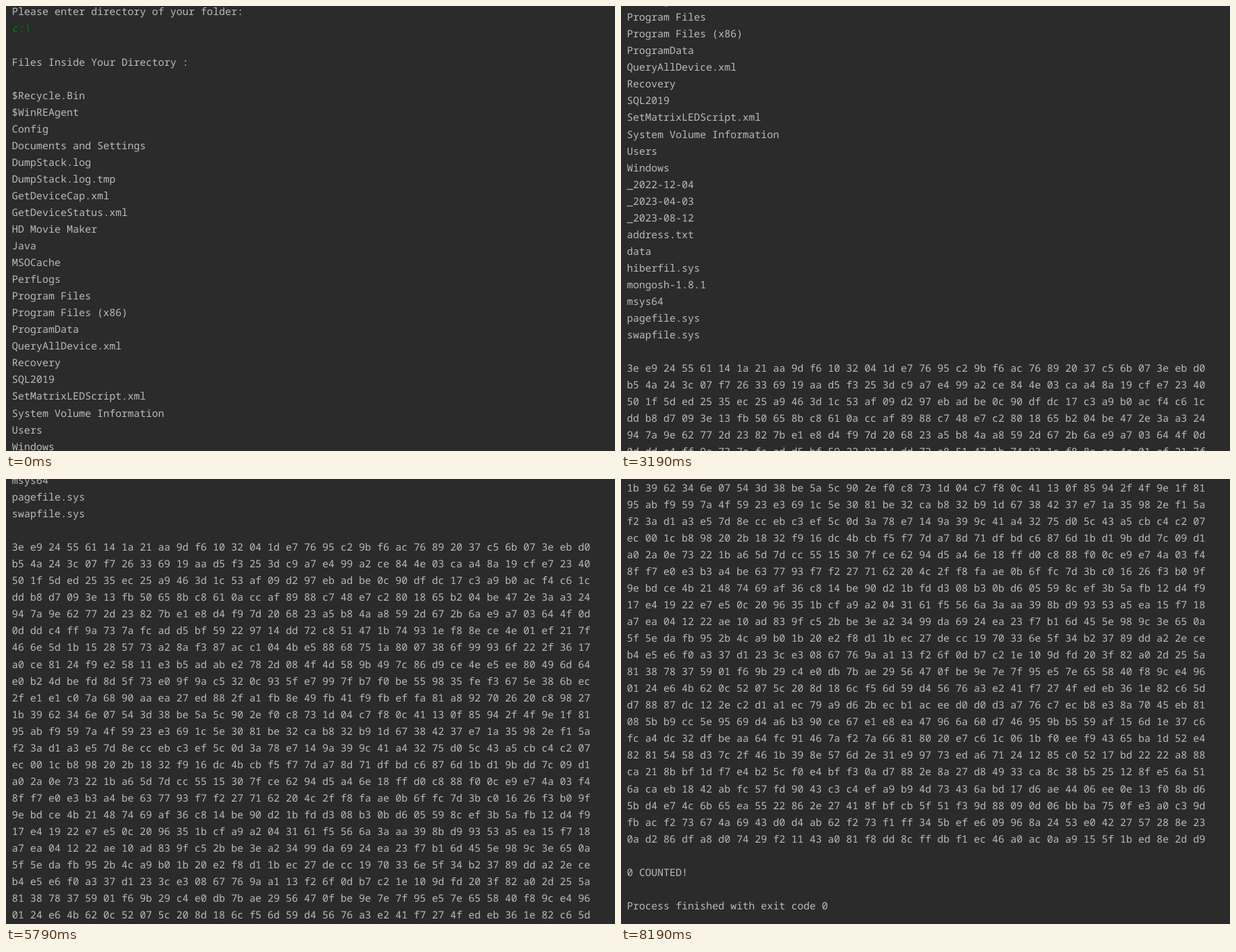
These frames come from a looping animation (875 px wide and 640 px high, 9190 ms). An HTML page:

```html
<!DOCTYPE html>
<html lang="en">
<head>
<meta charset="utf-8">
<title>Console scroll</title>
<style>
  html, body {
    margin: 0;
    width: 100%;
    height: 100%;
    overflow: hidden;
    background: #2b2b2b;
  }
  #stage {
    position: relative;
    width: 100%;
    height: 100%;
    overflow: hidden;
    contain: strict;
  }
  #console {
    position: absolute;
    left: 8.5px;
    top: -3.6px;
    margin: 0;
    color: #bbb;
    font: 500 14.59px/24.04px "Noto Sans Mono", monospace;
    font-variant-ligatures: none;
    text-rendering: geometricPrecision;
  }
  #console i { color: #007f00; }
</style>
</head>
<body>
<div id="stage"><pre id="console">Please enter directory of your folder:
<i>c:\</i>

Files Inside Your Directory :

$Recycle.Bin
$WinREAgent
Config
Documents and Settings
DumpStack.log
DumpStack.log.tmp
GetDeviceCap.xml
GetDeviceStatus.xml
HD Movie Maker
Java
MSOCache
PerfLogs
Program Files
Program Files (x86)
ProgramData
QueryAllDevice.xml
Recovery
SQL2019
SetMatrixLEDScript.xml
System Volume Information
Users
Windows
_2022-12-04
_2023-04-03
_2023-08-12
address.txt
data
hiberfil.sys
mongosh-1.8.1
msys64
pagefile.sys
swapfile.sys

<span id="dump"></span>

0 COUNTED!

Process finished with exit code 0
</pre></div>
<script>
const LOOP = 9190;
const STEP = 200;
const LAST_STEP = 41;
const DUMP_ROWS = 32;
const BYTES_PER_ROW = 32;
const output = document.getElementById("console");

// Scroll position in pixels at chosen steps
const scrollKeys = [
  [0, 0], [11, 262], [20, 513], [25, 686.5], [33, 961.5],
  [37, 1088], [38, 1117], [39, 1137], [41, 1150]
];

function seededBytes(seed) {
  return () => {
    seed = (Math.imul(seed, 1664525) + 1013904223) >>> 0;
    return seed >>> 24;
  };
}

function hexDump(nextByte) {
  const hexByte = () => nextByte().toString(16).padStart(2, "0");
  const row = () => Array.from({ length: BYTES_PER_ROW }, hexByte).join(" ");
  return Array.from({ length: DUMP_ROWS }, row).join("\n");
}

// The steps run slightly ahead of an even 200 ms beat
function stepAt(time) {
  const lead = time < 1000 ? 0 : time > 2000 && time < 3500 ? 20 : 10;
  return Math.min(LAST_STEP, Math.floor((time + lead) / STEP));
}

function scrollAt(step) {
  const next = Math.max(1, scrollKeys.findIndex(([at]) => at >= step));
  const [startStep, start] = scrollKeys[next - 1];
  const [endStep, end] = scrollKeys[next];
  return start + (end - start) * (step - startStep) / (endStep - startStep);
}

function draw() {
  const scroll = scrollAt(stepAt(performance.now() % LOOP));
  output.style.transform = `translateY(${-scroll}px)`;
  requestAnimationFrame(draw);
}

document.getElementById("dump").textContent = hexDump(seededBytes(18));
draw();
</script>
</body>
</html>
```
